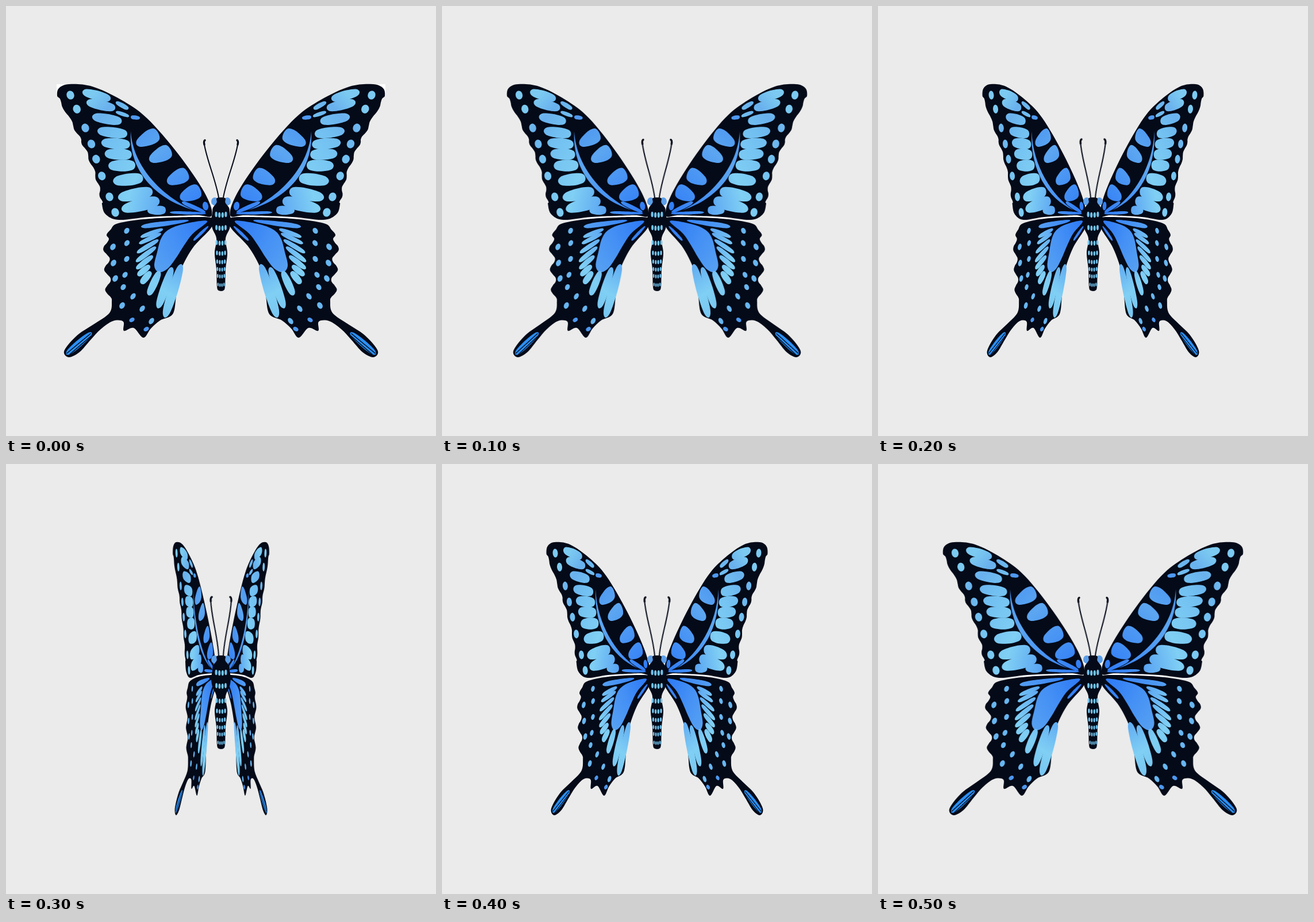
These frames come from a looping animation (748 by 748 pixels, 600 ms). An HTML page:

```html
<!DOCTYPE html>
<html lang="en">
<head>
<meta charset="utf-8">
<title>Butterfly</title>
<style>
  html, body { margin: 0; width: 100%; height: 100%; overflow: hidden; background: #ebebeb; }
  svg { display: block; width: 100vw; height: 100vh; }
  .wing { transform-origin: 368px 0; }
  .feeler { transform-origin: 370px 333px; }
  .line { fill: none; stroke: #040a18; stroke-linecap: round; }
</style>
</head>
<body>
<svg id="stage" viewBox="0 0 748 748">
  <defs>
    <radialGradient id="cell" gradientUnits="userSpaceOnUse" cx="358" cy="370" r="300">
      <stop offset="0" stop-color="#2f7df6"/>
      <stop offset=".25" stop-color="#559ff3"/>
      <stop offset=".5" stop-color="#80cff4"/>
      <stop offset=".75" stop-color="#72c0f1"/>
      <stop offset=".88" stop-color="#69b1ee"/>
      <stop offset="1" stop-color="#7ccaf1"/>
    </radialGradient>
    <radialGradient id="patch" gradientUnits="userSpaceOnUse" cx="358" cy="370" r="200">
      <stop offset="0" stop-color="#2a76f6"/>
      <stop offset=".35" stop-color="#438ff5"/>
      <stop offset=".75" stop-color="#5ca6f1"/>
      <stop offset="1" stop-color="#4f99f2"/>
    </radialGradient>
  </defs>
</svg>
<script>
const stage = document.getElementById('stage');
const INK = '#040a18', CELL = 'url(#cell)', PATCH = 'url(#patch)', SPOT = '#68b6f0', MARK = '#72c2ec';

const range = n => [...Array(n).keys()];
const pairs = text => text.trim().split(', ').map(p => p.split(' ').map(Number));

// n evenly spaced points on a smooth curve through the key points
function along(text, n) {
  const keys = pairs(text), last = keys.length - 1;
  const key = i => keys[Math.max(0, Math.min(last, i))];
  return range(n).map(k => {
    const u = k / (n - 1) * last, i = Math.min(last - 1, Math.floor(u)), f = u - i;
    return [0, 1].map(j => {
      const [a, b, c, d] = [-1, 0, 1, 2].map(o => key(i + o)[j]);
      return b + f / 2 * (c - a + f * (2 * a - 5 * b + 4 * c - d + f * (3 * (b - c) + d - a)));
    });
  });
}

// Closed smooth shape through points
function blob(points, fill) {
  const len = points.length, at = i => points[(i + len) % len];
  let d = 'M' + at(0);
  for (let i = 0; i < len; i++) {
    const [a, b, c, e] = [at(i - 1), at(i), at(i + 1), at(i + 2)];
    const p = [0, 1].map(j => b[j] + (c[j] - a[j]) / 6);
    const q = [0, 1].map(j => c[j] - (e[j] - b[j]) / 6);
    d += `C${p} ${q} ${c}`;
  }
  return `<path d="${d}Z" fill="${fill}"/>`;
}

// Rounded cell between two points, with half widths w1 and w2
function petal([x1, y1], [x2, y2], w1, w2, fill) {
  const dx = x2 - x1, dy = y2 - y1, len = Math.hypot(dx, dy);
  const spot = (u, h) => {
    const w = h * (w1 + (w2 - w1) * u) / len;
    return [x1 + dx * u - dy * w, y1 + dy * u + dx * w];
  };
  return blob([spot(0, 0), spot(.1, .7), spot(.4, 1), spot(.7, 1), spot(.93, .7),
    spot(1, 0), spot(.93, -.7), spot(.7, -1), spot(.4, -1), spot(.1, -.7)], fill);
}

function fan(from, to, n, width, fill) {
  const ends = along(to, n);
  return along(from, n).map((p, i) => petal(p, ends[i], ...width(i / (n - 1)), fill)).join('');
}
const oval = (x, y, rx, ry, turn, fill) =>
  `<ellipse cx="${x}" cy="${y}" rx="${rx}" ry="${ry}" transform="rotate(${turn} ${x} ${y})" fill="${fill}"/>`;
const dots = (keys, n, rx, ry, turn, fill = SPOT) =>
  along(keys, n).map(([x, y]) => oval(x, y, rx, ry, turn, fill)).join('');

const foreEdge = along('89 156, 119 212, 140 254, 159 305, 167 345', 31)
  .map(([x, y], i) => [x + 2 * Math.sin(i / 30 * Math.PI * 13), y]);
const foreWing = [
  ...pairs('358 364, 345 324, 300 258, 245 195, 200 163, 150 140, 110 136, 92 143'),
  ...foreEdge,
  ...pairs('173 362, 196 372, 250 367, 330 364')
];

const hindEdge = range(18).map(i => {
  const y = 398 + i * 6.8;
  return [173.5 + (y - 405) * .05 + 5.5 * Math.cos((y - 405) / 35.5 * 2 * Math.PI), y];
});
const hindWing = [
  ...pairs('360 370, 330 367, 250 370, 195 378, 182 389'),
  ...hindEdge,
  ...pairs('180 534, 152 554, 126 571, 106 592, 101 604, 110 611, 128 602, 147 581, 165 562, 186 548'),
  ...pairs('204 549, 205 565, 222 560, 239 577, 252 561, 268 547, 290 536, 296 505, 302 465, 324 422, 356 387')
];

const big = pairs('258 452, 263 428, 270 404, 283 389, 310 379, 350 374, 325 396, 310 416, 296 438, 281 457, 266 463');

const hind = blob(hindWing, INK) + blob(big, PATCH)
  + petal([235, 384], [318, 373], 5.5, 2.5, PATCH)
  + petal([326, 408], [352, 383], 3, 2, PATCH)
  + fan('234 402, 226 445, 235 483, 276 542', '273 388, 261 419, 252 462, 305 449', 10,
    t => [4.2 + 5 * t * t, 3.4 + 4 * t * t], CELL)
  + dots('186 419, 187 447, 190 474, 202 521', 4, 4.5, 6, 30)
  + dots('210 391, 210 440, 204 489', 5, 4.2, 5.5, 35)
  + dots('221 505, 253 548', 3, 4, 6, 35)
  + dots('219 546, 244 562', 2, 5, 3.5, -30, '#4d98f0')
  + petal([105, 606], [149, 568], 6.5, 5, '#2b90f7')
  + '<path class="line" stroke-width="1.6" d="M106 604L147 570M111 606L148 574"/>';

const fore = blob(foreWing, INK)
  + petal([191, 167], [213, 179], 4, 4, CELL)
  + petal([191, 184], [214, 192], 3.5, 3, CELL)
  + petal([217, 193], [233, 195], 4, 3, PATCH)
  + fan('133 149, 159 217, 178 278, 201 354', '182 162, 211 223, 225 277, 267 338', 10,
    t => [8.5 + 2 * t, 7.5 + 3.5 * t], CELL)
  + fan('227 241, 303 335', '265 221, 338 319', 4, () => [9, 15], PATCH)
  + dots('112 155, 142 222, 163 285, 190 359', 8, 6.6, 7.6, -20, CELL)
  + petal([246, 356], [278, 355], 7, 8, CELL)
  + petal([306, 341], [347, 359], 4, 3, PATCH)
  + petal([285, 359], [348, 361], 3, 2, PATCH)
  + oval(347, 348, 5, 7.5, -10, PATCH)
  + `<path fill="${PATCH}" d="M217 218C213 285 258 335 326 355C270 330 221 279 217 218Z"/>`;

const half = `
  <path class="corner" d="M88 136H112L88 156Z" fill="#fff"/>
  <g class="feeler">
    <path class="line" stroke-width="2" d="M370 333C364 300 350 270 345 241"/>
    <path class="line" stroke-width="3.4" d="M345 241Q343.5 235 346 233.5"/>
  </g>
  <path d="M357 345H369V356H360Z" fill="#fff"/>
  <g class="wing">
    <path d="M240 370Q300 364 358 367" fill="none" stroke="#fff" stroke-width="3"/>
    ${hind}${fore}
  </g>
  <ellipse cx="363" cy="340" rx="6" ry="7" fill="#5c9fea"/>`;

// Body from half widths down the middle line
const profile = pairs('7 334, 7.5 342, 14 351, 15 360, 17 372, 15 387, 9 400, 8 410, 11 430, 8 458, 7 488, 4 495');
const body = [
  ...profile.map(([w, y]) => [374 + w, y]),
  ...profile.reverse().map(([w, y]) => [374 - w, y])
];
const marks = [364, 387, 413, 431, 446, 459, 471, 486].map((y, i) => [-1.5, -.5, .5, 1.5]
  .map(k => oval(374 + k * (5.6 - .3 * i), y - Math.abs(k), 2.1 - .13 * i, 4.7 - .22 * i, 0, MARK)).join('')).join('');

stage.insertAdjacentHTML('beforeend', `
  <g>${half}</g>
  <g transform="translate(748 0) scale(-1 1)">${half}</g>
  ${blob(body, INK)}${marks}`);

// Wings fold in three steps and open again, 100 ms per pose
const widths = [1, .914, .668, .279];
const beat = [0, 1, 2, 3, 2, 1, 0];

function play(selector, style) {
  const frames = beat.map((pose, i) => ({ ...style(pose), offset: i / 6, easing: 'step-end' }));
  for (const el of stage.querySelectorAll(selector)) {
    el.animate(frames, { duration: 600, iterations: Infinity }).startTime = 0;
  }
}
play('.wing', pose => ({ transform: `scaleX(${widths[pose]})` }));
play('.feeler', pose => ({ transform: `rotate(${2.3 * pose}deg)` }));
play('.corner', pose => ({ opacity: pose ? 0 : 1 }));
</script>
</body>
</html>
```
